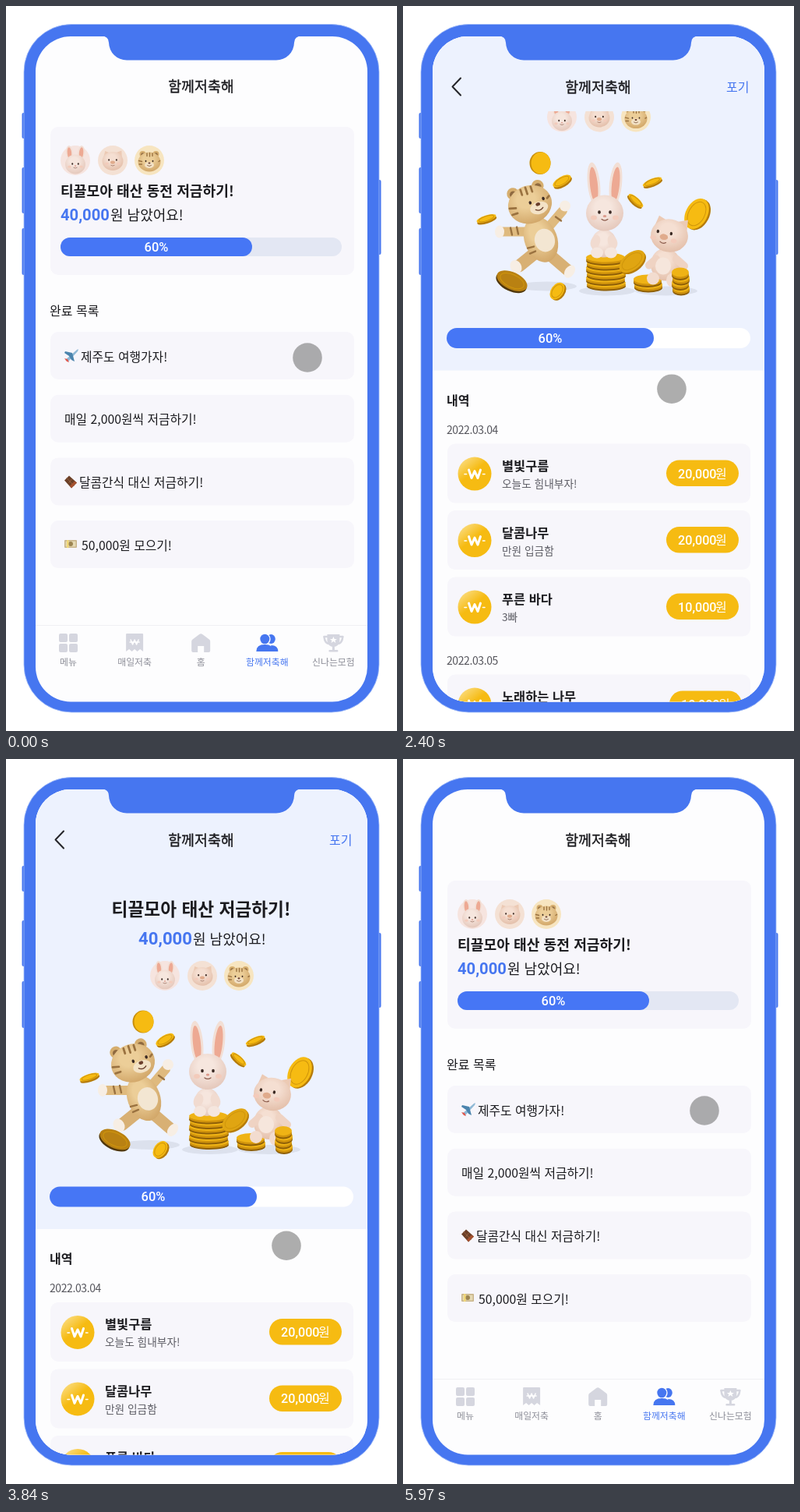
Write an HTML page that moves like this. It is 502 px wide and 930 px high and loops after 6000 ms.

```html
<!DOCTYPE html>
<html lang="ko">
<head>
<meta charset="utf-8">
<style>
html, body { margin: 0; height: 100%; overflow: hidden; background: #fff; }
svg { display: block; width: 502px; height: 930px; font-family: "Noto Sans CJK KR", "Noto Sans CJK", sans-serif; }
.num { font-family: Roboto, sans-serif; }
</style>
</head>
<body>
<svg id="stage" viewBox="0 0 502 930"></svg>
<script>
const BLUE = '#4676f0', CARD = '#f7f6fb', INK = '#1b1b1f', GOLD = '#f6bb12', GRAY = '#d5d6df';

// Drawing helpers, each returning SVG markup
const E = (x, y, rx, ry, fill, rot = 0) =>
  `<ellipse cx="${x}" cy="${y}" rx="${rx}" ry="${ry}" fill="${fill}" transform="rotate(${rot} ${x} ${y})"/>`;
const R = (x, y, w, h, r, fill, more = '') =>
  `<rect x="${x}" y="${y}" width="${w}" height="${h}" rx="${r}" fill="${fill}" ${more}/>`;
const P = (d, fill) => `<path d="${d}" fill="${fill}"/>`;
const L = (d, color, w) =>
  `<path d="${d}" fill="none" stroke="${color}" stroke-width="${w}" stroke-linecap="round" stroke-linejoin="round"/>`;
const T = (x, y, size, text, fill = INK, more = '') =>
  `<text x="${x}" y="${y}" font-size="${size}" fill="${fill}" ${more}>${text}</text>`;
const G = (x, y, body, rot = 0, s = 1) => `<g transform="translate(${x} ${y}) rotate(${rot}) scale(${s})">${body}</g>`;
const MID = 'text-anchor="middle"', BOLD = 'font-weight="700"', NUM = 'class="num" font-weight="500"';

const title = y => T(250.5, y, 18.4, '함께저축해', INK, `${MID} stroke="${INK}" stroke-width=".35"`);
const amountLeft = (x, y, size, gap) =>
  T(x, y, size, '40,000', BLUE, 'class="num" font-weight="700"') + T(x + gap, y, 18, '원 남았어요!');
const bar = (x, y, w, h, fillW, track) =>
  R(x, y, w, h, h / 2, track) + R(x, y, fillW, h, h / 2, '#4676f5') +
  T(x + fillW / 2, y + h / 2 + 5.8, 16.5, '60%', '#fff', `${NUM} ${MID}`);

// Animal heads around 0,0; turn moves the face sideways
const eyes = (dx, y = -1) => E(-dx, y, 1.8, 2.3, '#3b2a24') + E(dx, y, 1.8, 2.3, '#3b2a24');
const smile = L('M-4 8Q0 11 4 8', '#8a5a4a', 1.2);
const cheeks = E(-14, 6, 4, 3, '#f3cbbb') + E(14, 6, 4, 3, '#f3cbbb');
const rabbitHead = long =>
  [-1, 1].map(s => E(s * 14, -12 - long * .9, 8, long, '#f2dfd5', s * 6) +
    E(s * 14, -11 - long * .9, 5, long * .82, '#eda993', s * 6)).join('') +
  E(0, 0, 24, 23, 'url(#rose)') + cheeks + eyes(7) + E(0, 4, 2.2, 1.5, '#dd9a8b') + smile;
const pigHead = (turn = 0) =>
  P('M-22 -8L-18 -24L-3 -18Z', '#eccab4') + P('M22 -8L21 -25L5 -19Z', '#eccab4') +
  E(0, 0, 25, 22, 'url(#peach)') +
  G(turn, 0, cheeks + eyes(9, -3) + E(0, 3, 5.5, 4, '#e0ab8c') + L('M-4 10Q0 13 4 10', '#8a5a4a', 1.2));
const tigerHead = (turn = 0) =>
  [-1, 1].map(s => E(s * 17, -20, 8, 8, '#d6ae6e') + E(s * 17, -19, 4.5, 4.5, '#8f6a40')).join('') +
  E(0, 0, 29, 25, 'url(#tan)') +
  L('M-6 -22V-15M1 -23V-14M8 -22V-15M-27 -3L-19 -1M-26 6L-19 6M27 -3L24 -1', '#9a7240', 2.8) +
  G(turn, 0, E(0, 8, 12, 8, '#f3e2c6') + eyes(9, -2) + E(0, 3, 3, 2.2, '#6b3f2c') + L('M-5 9Q0 13 5 9', '#6b3f2c', 1.4));

const avatars = (x, y) =>
  E(x, y, 19, 19, '#f6e4df') + G(x, y + 5, rabbitHead(17), 0, .54) +
  E(x + 48, y, 19, 19, '#f4e1d4') + G(x + 48, y + 1, pigHead(), 0, .54) +
  E(x + 95, y, 19, 19, '#f7e5c0') + G(x + 95, y + 2, tigerHead(), 0, .5);

// Loose coins and stacks
const coin = (x, y, rx, ry, rot, face = GOLD, side = '#b67c09') =>
  G(x, y, E(0, 2.5, rx, ry, side) + E(0, 0, rx, ry, face) +
    `<ellipse rx="${rx * .78}" ry="${ry * .74}" fill="none" stroke="#d0960c"/>`, rot);
const stack = (x, top, rx, n) =>
  Array.from({ length: n }, (_, i) => n - 1 - i).map(i => {
    const y = top + i * 6.5, dx = i % 2;
    return E(x + dx, y + 4.5, rx, 6, '#8f6008') + E(x + dx, y + 2.5, rx, 6, '#d0930c') + E(x + dx, y, rx, 6, '#efb315');
  }).join('');

const tiger =
  L('M158 405L128 405', '#dfba7e', 12) + L('M186 400L205 378', '#dfba7e', 12) +
  L('M170 432L149 449', '#d8b074', 16) + L('M190 436L211 454', '#d8b074', 15) +
  E(124, 405, 6, 8, '#f7eee4') + E(208, 372, 7, 7, '#f7eee4') +
  E(145, 450, 7, 9, '#f7eee4', -30) + E(214, 456, 6, 9, '#f7eee4', 35) +
  E(177, 415, 21, 30, 'url(#tan)', -20) + E(182, 416, 13, 15, '#f3e6d2', -14) +
  L('M138 400L140 409M146 399L148 408M160 426L168 424M163 433L170 430M196 386L203 391', '#9a7240', 2.4) +
  G(163, 370, tigerHead(10), -18, .98);
const rabbit =
  E(258, 420, 16, 18, 'url(#rose)') + G(259, 381, rabbitHead(28)) +
  E(247, 418, 6, 9, '#f1dbd0', 20) + E(269, 418, 6, 9, '#f1dbd0', -20) +
  E(249, 432, 8, 7, '#f5e6de') + E(267, 432, 8, 7, '#f5e6de');
const pig =
  E(337, 447, 19, 21, 'url(#peach)') + L('M325 440L316 448', '#efd3c3', 10) + L('M351 440L361 449', '#efd3c3', 10) +
  E(334, 449, 10, 11, '#f6e6dc') + E(321, 465, 8, 8, '#f2dccf') + E(346, 467, 8, 9, '#f2dccf') +
  G(342, 410, pigHead(-7), 10, .96);
const scene =
  E(185, 475, 38, 6, '#dce1ed') + E(262, 481, 36, 6, '#dce1ed') + E(338, 481, 40, 6, '#dce1ed') +
  E(176, 317, 13.5, 14.5, '#c88e0a') + E(177, 317, 12.5, 14, GOLD) +
  coin(204, 340, 13, 5.5, -30) + coin(107, 388, 13, 4, -18) + coin(299, 365, 12, 4, 42) + coin(320, 341, 13, 4, -22) +
  coin(377, 382, 21, 14, -62) + tiger + coin(140, 468, 21, 11, 25, '#b98112', '#50370c') + coin(198, 481, 12, 8, -55) +
  stack(260, 438, 25, 6) + rabbit + coin(294, 443, 19, 11, -38, '#e0a512') +
  stack(314, 466, 18, 2) + pig + stack(356, 457, 11, 4);

// First page
const plane = P('M1 13L16 0Q19 -2 17 2L5 15Z', '#8fb9d6') + P('M1 2L10 4L13 15L9 13L6 8L0 4Z', '#4b84ad') +
  P('M0 11L4 12L6 16L3 15Z', '#e2574b');
const choco = P('M0 6L6 0L16 9L9 16Z', '#6b3f27') + L('M3 3L12 13M6 9L9 5', '#96613f', 1) + P('M7 13L13 7L16 9L9 16Z', '#a5512f');
const cash = R(0, 2, 16, 10, 1, '#c8b48a') + R(1.5, 3.5, 13, 7, 0, '#e6dab4') + E(8, 7, 3, 3, '#9c8552') + R(3, 2, 2.5, 10, 0, '#f1d777');
const goals = [
  ['제주도 여행가자!', plane, 96], ['매일 2,000원씩 저금하기!', '', 75],
  ['달콤간식 대신 저금하기!', choco, 94], ['50,000원 모으기!', cash, 97]
];
const icons = [
  [[-12, -12], [1, -12], [-12, 1], [1, 1]].map(([x, y]) => R(x, y, 11, 11, 2, GRAY)).join(''),
  P('M-10 -12H10Q11 -12 11 -11V11L7 8L3.5 11L0 8L-3.5 11L-7 8L-11 11V-11Q-11 -12 -10 -12Z', GRAY) +
    L('M-5 -4L-2.5 2L0 -4L2.5 2L5 -4M-6 -1H6', '#fff', 1.5),
  P('M-12 -2Q-12 -4 -10 -5L-2 -11Q0 -12.5 2 -11L10 -5Q12 -4 12 -2V10Q12 12 10 12H4V4H-4V12H-10Q-12 12 -12 10Z', GRAY),
  E(5, -5, 5.5, 6, BLUE) + P('M5 3Q14 3 14 11H5Z', BLUE) + E(-3, -5, 7.4, 7.6, '#fdfdfe') + E(-3, -5, 6, 6.3, BLUE) +
    P('M-14 11Q-14 2 -3 2Q8 2 8 11Z', BLUE),
  L('M-7 -8H-12Q-11 1 -5 1M7 -8H12Q11 1 5 1', GRAY, 2.5) + P('M-8 -11H8V-3Q7 5 0 5Q-7 5 -8 -3Z', GRAY) +
    R(-1.5, 4, 3, 5, 0, GRAY) + R(-6, 9, 12, 2.5, 1, GRAY) + P('M0 -8L1.3 -5L4.5 -5L2 -3L3 0L0 -2L-3 0L-2 -3L-4.5 -5L-1.3 -5Z', '#fff')
];
const tabs = ['메뉴', '매일저축', '홈', '함께저축해', '신나는모험'];
const listPage =
  title(110) + R(57, 155, 390, 190, 10, CARD) + avatars(89, 198) +
  T(70, 244, 18.2, '티끌모아 태산 동전 저금하기!', INK, BOLD) + amountLeft(70, 275, 20.2, 64) +
  bar(70, 297, 361, 24, 246, '#e3e7f3') + T(56, 397, 16, '완료 목록') +
  goals.map(([text, icon, x], i) => {
    const y = 418 + i * 80.7;
    return R(57, y, 390, 61, 10, CARD) + G(75, y + 23, icon) + T(x, y + 37.5, 15.8, text);
  }).join('') +
  R(38, 794, 426, 1, 0, '#f0f0f3') +
  tabs.map((text, i) => {
    const x = 80 + i * 85.1;
    return G(x, 817, icons[i]) + T(x, 846, 11.9, text, i == 3 ? BLUE : '#8d8e98', MID);
  }).join('');

// Second page
const entries = [
  [677, '별빛구름', '오늘도 힘내부자!', '20,000', 0], [762.5, '달콤나무', '만원 입금함', '20,000', 0],
  [848, '푸른 바다', '3빠', '10,000', 0], [973, '노래하는 나무', '늦게 넣어서 미안', '10,000', 4]
];
const entry = ([y, name, note, sum, dx]) =>
  R(57, y, 389, 76, 10, CARD) + E(92, y + 38.5, 21.5, 21.5, 'url(#shine)') +
  L(`M84.5 ${y + 33.5}l3.5 10.5l4 -9l4 9l3.5 -10.5`, '#fff', 3) + L(`M79 ${y + 39}h2.5m21 0h2.5`, '#fff', 1.6) +
  T(127, y + 34.5, 16.4, name, INK, BOLD) + T(127, y + 56.5, 13.7, note, '#5c5c64') +
  R(338 + dx, y + 21, 93, 33.5, 16.75, GOLD) + T(353 + dx, y + 44, 16.2, sum, '#fff', NUM) +
  T(401 + dx, y + 44, 16, '원', '#fff', 'font-weight="300"');
const date = (y, text) => T(56, y, 14, text, '#55555c', 'letter-spacing="-.4"');
const detail =
  R(38, -100, 426, 683, 0, '#edf2fe') +
  T(250.5, 181, 22.7, '티끌모아 태산 저금하기!', INK, `${BOLD} ${MID}`) + amountLeft(170, 218, 22.2, 70) +
  avatars(204, 258) + scene + bar(56, 528.5, 390, 26, 266, '#fff') +
  T(56, 627, 16, '내역', INK, BOLD) + date(664, '2022.03.04') + date(960, '2022.03.05') +
  entries.map(entry).join('');

const ball = (id, a, b) => `<radialGradient id="${id}" cx=".45" cy=".35" r=".7"><stop offset=".3" stop-color="${a}"/><stop offset="1" stop-color="${b}"/></radialGradient>`;
const stage = document.getElementById('stage');
stage.innerHTML =
  `<defs>${ball('rose', '#f6e6de', '#e3c5b8')}${ball('peach', '#f5dfd2', '#e2bca6')}${ball('tan', '#ecce98', '#cfa364')}
   <linearGradient id="shine" x2=".8" y2="1"><stop stop-color="#fce49a"/><stop offset=".5" stop-color="${GOLD}"/></linearGradient>
   <clipPath id="screen">${R(38, 39, 426, 853.5, 45, '#000')}</clipPath>
   <clipPath id="view">${R(38, 135, 426, 760, 0, '#000')}</clipPath></defs>` +
  R(20.5, 137, 6, 33, 2, BLUE) + R(20.5, 207, 6, 59, 2, BLUE) + R(20.5, 285, 6, 60, 2, BLUE) + R(475, 223, 6.5, 96, 2, BLUE) +
  R(23, 23.5, 456, 882.5, 61, BLUE, 'stroke="#9db9f8" stroke-width=".8"') +
  `<g clip-path="url(#screen)">${R(38, 38, 426, 856, 0, '#fdfdfe')}<g id="list">${listPage}</g>
   <g id="detail">${R(38, 38, 426, 856, 0, '#fdfdfe')}
   <g clip-path="url(#view)"><g id="scroll">${detail}</g></g>${R(38, 38, 426, 97, 0, '#edf2fe')}
   ${title(110.5)}${L('M74 92.5L63.5 103.5L74 114.5', '#26262b', 2)}${T(415, 110, 16, '포기', BLUE)}</g></g>` +
  P('M122 38Q132 39 132 47A23 23 0 0 0 155 69.5H347A23 23 0 0 0 370 47Q370 39 380 38Z', BLUE) +
  '<circle id="touch" r="18.8" fill-opacity=".6"/>';

// Smooth curve through keys [time, value, ...]; slope is zero at turning points
function follow(keys, t, c = 1) {
  const n = keys.length - 1;
  if (t <= keys[0][0]) return keys[0][c];
  if (t >= keys[n][0]) return keys[n][c];
  const i = keys.findIndex(k => k[0] > t) - 1;
  const rate = j => (keys[j + 1][c] - keys[j][c]) / (keys[j + 1][0] - keys[j][0]);
  const slope = j => {
    if (j == 0 || j == n) return 0;
    const a = rate(j - 1), b = rate(j);
    return a * b <= 0 ? 0 : 2 * a * b / (a + b);
  };
  const h = keys[i + 1][0] - keys[i][0], u = (t - keys[i][0]) / h, v = 1 - u;
  return keys[i][c] * v * v * (1 + 2 * u) + keys[i + 1][c] * u * u * (3 - 2 * u) +
    h * u * v * (v * slope(i) - u * slope(i + 1));
}

const touchPath = [
  [0, 387, 451], [630, 335, 304], [840, 397, 268], [1260, 397, 268], [1950, 345, 515], [2120, 345, 585],
  [2670, 345, 351], [3000, 345, 235], [3080, 345, 235], [3210, 346, 274], [3560, 352, 465], [3840, 360, 624],
  [3930, 360, 638], [4170, 340, 560], [4800, 74, 105], [4890, 82, 119], [5070, 82, 119], [5310, 89, 122],
  [5670, 385, 448], [5760, 387, 451]
];
const scrollPath = [[2120, 0], [2400, 115], [2640, 230], [3080, 230], [3210, 191], [3560, 0], [3780, -24], [3840, -20], [4150, 0]];
const fadePath = [[1020, 0], [1560, 1], [5040, 1], [5580, 0]];
const pressPath = [[800, 0], [840, 1], [1250, 1], [1400, 0], [4830, 0], [4890, 1], [5350, 1], [5500, 0]];

const [list, page, scroll, touch] = ['list', 'detail', 'scroll', 'touch'].map(id => document.getElementById(id));
function draw(now) {
  const t = now % 6000, shade = Math.round(120 - 48 * follow(pressPath, t));
  list.setAttribute('transform', `translate(0 ${t < 3000 ? 0 : 1})`);
  page.setAttribute('opacity', follow(fadePath, t));
  scroll.setAttribute('transform', `translate(0 ${-follow(scrollPath, t)})`);
  touch.setAttribute('cx', follow(touchPath, t, 1));
  touch.setAttribute('cy', follow(touchPath, t, 2));
  touch.setAttribute('fill', `rgb(${shade},${shade},${shade})`);
}
const start = performance.now();
function tick() {
  draw(performance.now() - start);
  requestAnimationFrame(tick);
}
tick();
</script>
</body>
</html>
```
